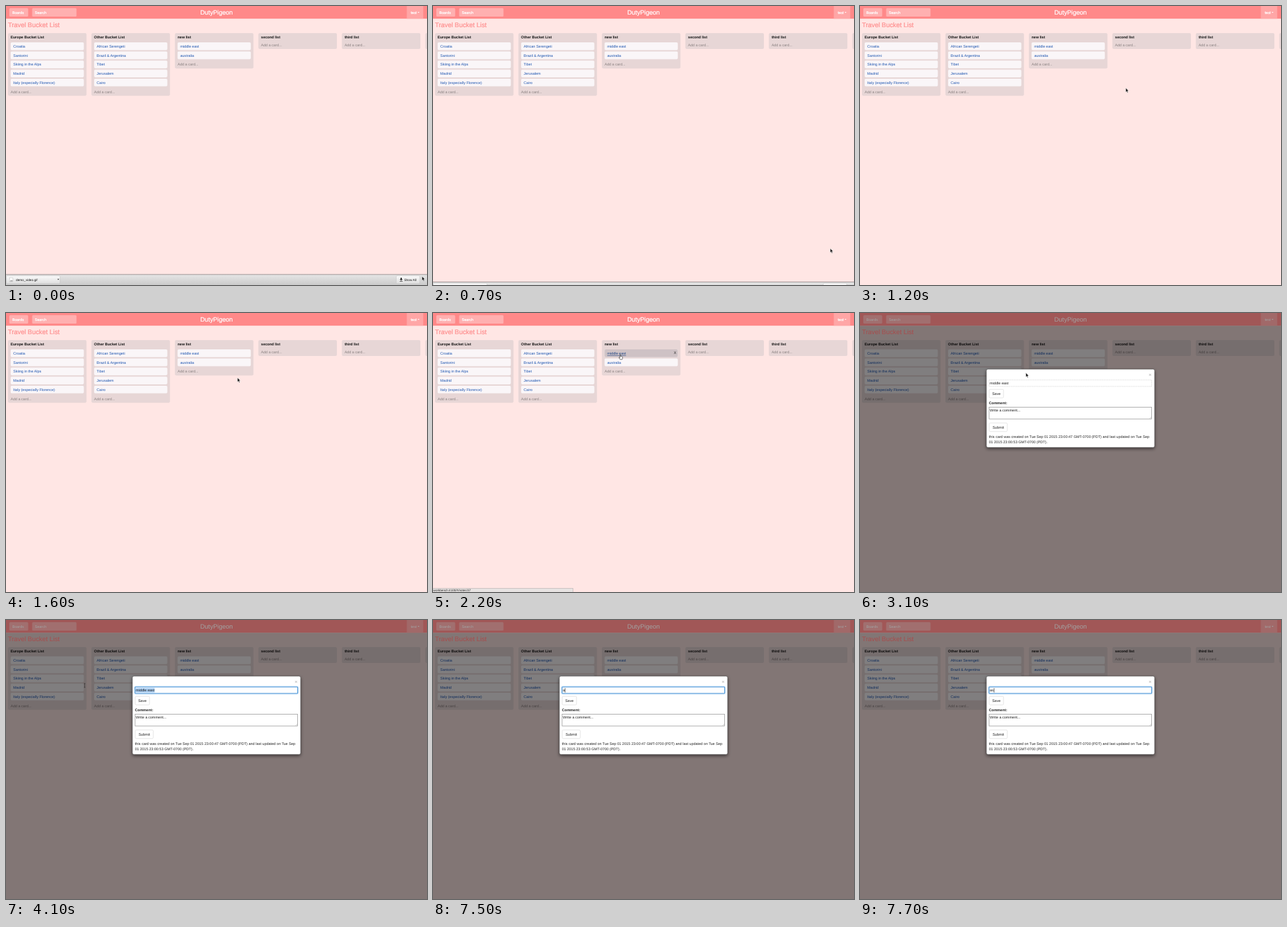
Recreate the animation shown at these times as an HTML page. Size 636 px wide and 422 px high, loop 8000 ms.

```html
<!DOCTYPE html>
<html lang="en">
<head>
<meta charset="utf-8">
<title>Travel board</title>
<style>
html, body { margin: 0; width: 100%; height: 100%; overflow: hidden; background: #ffe6e4; }
svg { display: block; width: 636px; height: 422px; }
text {
  font-family: "Liberation Sans", Arial, sans-serif;
  font-size: 5.55px;
  text-rendering: geometricPrecision;
  white-space: pre;
}
.thick text { stroke: currentColor; stroke-width: .22px; }
</style>
</head>
<body>
<svg id="stage" viewBox="0 0 636 422" xmlns="http://www.w3.org/2000/svg">
  <defs>
    <linearGradient id="shelf" x1="0" y1="0" x2="0" y2="1">
      <stop offset="0" stop-color="#e6e6e6"/><stop offset="1" stop-color="#c9c9c9"/>
    </linearGradient>
    <linearGradient id="button" x1="0" y1="0" x2="0" y2="1">
      <stop offset="0" stop-color="#fafafa"/><stop offset="1" stop-color="#dedede"/>
    </linearGradient>
    <filter id="shadow" x="-10%" y="-10%" width="120%" height="130%">
      <feDropShadow dx="0" dy="2" stdDeviation="2.6" flood-opacity=".55"/>
    </filter>
    <filter id="glow" x="-5%" y="-50%" width="110%" height="200%">
      <feDropShadow dx="0" dy="0" stdDeviation=".8" flood-color="#66afe9" flood-opacity=".8"/>
    </filter>
  </defs>
</svg>
<script>
const LOOP = 8000, STEP = 100;
const stage = document.getElementById('stage');

function el(parent, tag, attrs) {
  const node = document.createElementNS('http://www.w3.org/2000/svg', tag);
  for (const k in attrs) node.setAttribute(k, attrs[k]);
  parent.appendChild(node);
  return node;
}
const group = (parent, attrs) => el(parent, 'g', attrs);
const box = (parent, x, y, width, height, fill, more) =>
  el(parent, 'rect', { x, y, width, height, fill, ...more });
const path = (parent, d, more) => el(parent, 'path', { d, ...more });
function label(parent, x, y, str, fill, more) {
  const node = el(parent, 'text', { x, y, fill, color: fill, ...more });
  node.textContent = str;
  return node;
}
const show = (node, on) => node.setAttribute('display', on ? 'inline' : 'none');

// Page
const page = group(stage);
box(page, 0, 0, 636, 422, '#ffe6e4');
const head = group(page);
box(head, 0, 0, 636, 19.2, '#ff8989');
box(head, 5, 3.3, 28.5, 12.6, '#ffb0b0', { rx: 1.5 });
box(head, 39.5, 3.3, 67, 12.6, '#ffb0b0', { rx: 1.5 });
box(head, 605.5, 0, 24.8, 19.2, '#ffa6a6');
label(head, 9.5, 11.6, 'Boards', '#fff', { 'font-size': 5.6 });
label(head, 43.5, 11.5, 'Search', '#fff');
label(head, 318, 13, 'DutyPigeon', '#fff', { 'text-anchor': 'middle', style: 'font-size:9.5px' });
label(head, 611.5, 11.5, 'test', '#fff');
path(head, 'M621.8 9h2.8l-1.4 1.5z', { fill: '#fff' });

const lists = [
  ['Europe Bucket List', 'Croatia', 'Santorini', 'Skiing in the Alps', 'Madrid', 'Italy (especially Florence)'],
  ['Other Bucket List', 'African Serengeti', 'Brazil & Argentina', 'Tibet', 'Jerusalem', 'Cairo'],
  ['new list', 'middle east', 'australia'],
  ['second list'],
  ['third list'],
  ['']
];
const PITCH = 13.73;
lists.forEach(([name, ...cards], i) => {
  const x = 3 + i * 126.1;
  const extra = cards.length ? cards.length * PITCH + 2 : 0;
  box(page, x, 41, 118.6, 24 + extra, '#e7d6d6', { rx: 2 });
  if (!name) return;
  label(page, x + 4, 49, name, '#111', { 'font-weight': 'bold' });
  cards.forEach((card, j) => {
    const y = 55 + j * PITCH;
    box(page, x + 4, y, 110.6, 11.7, '#faf6f8', { rx: 1.8 });
    label(page, x + 8, y + 8, card, '#1d55b0');
  });
  label(page, x + 4, 61 + extra, 'Add a card...', '#8b8282');
});

const hover = group(page);
box(hover, 259.2, 55, 110.6, 11.7, '#cec2c5', { rx: 1.8 });
label(hover, 263.2, 63, 'middle east', '#1f4684', { 'text-decoration': 'underline' });
label(hover, 365.6, 61.7, 'X', '#222', { 'text-anchor': 'middle' });

// Backdrop
const dim = group(stage);
box(dim, 0, 19.2, 636, 402.8, '#000', { opacity: .49 });
box(dim, 0, 0, 636, 19.2, '#000', { opacity: .37 });

const heading = group(stage);
const title = label(heading, 3, 32, 'Travel Bucket List', '#ff8f8f', { style: 'font-size:9.9px' });

// Dialog
const dialog = group(stage);
box(dialog, 191, 85, 254, 118.3, '#fff', { rx: 2.2, stroke: '#444', 'stroke-width': .5, filter: 'url(#shadow)' });
label(dialog, 438.2, 96, '×', '#aaa', { 'text-anchor': 'middle', style: 'font-size:7.6px' });
const line = (fill, w) => ({ stroke: fill, 'stroke-width': w });
const idle = box(dialog, 195, 101.2, 245.6, 9.8, '#fff', { ...line('#bbb', .6), 'stroke-dasharray': '.8 .8' });
const focus = box(dialog, 195, 101.2, 245.6, 9.8, '#fff', { ...line('#4a94d6', 1.1), rx: .6, filter: 'url(#glow)' });
const marked = box(dialog, 196, 102.8, 28.5, 6.8, '#a9cdf2');
const field = label(dialog, 196, 108, '', '#222');
const caret = box(dialog, 0, 103, .6, 6.6, '#111');
box(dialog, 195.2, 115.4, 21.6, 13, '#fff', { rx: 1.5, ...line('#ccc', .5) });
label(dialog, 206, 123.9, 'Save', '#222', { 'text-anchor': 'middle' });
label(dialog, 194.8, 138.2, 'Comment:', '#222', { 'font-weight': 'bold' });
box(dialog, 195, 142.4, 245.6, 17.8, '#fff', line('#8d8d8d', .7));
label(dialog, 196, 149.3, 'Write a comment...', '#222');
path(dialog, 'M437.6 159.6l2.4-2.4M439 159.6l1-1', { ...line('#888', .4) });
box(dialog, 195.2, 166.3, 27.2, 13, '#fff', { rx: 1.5, ...line('#ccc', .5) });
label(dialog, 208.8, 174.8, 'Submit', '#222', { 'text-anchor': 'middle' });
['this card was created on Tue Sep 01 2015 23:00:47 GMT-0700 (PDT) and last updated on Tue Sep',
 '01 2015 23:00:53 GMT-0700 (PDT).'].forEach((str, i) =>
  label(dialog, 194.8, 189.4 + i * 8, str, '#222', { style: 'font-size:5.52px' }));

// Link status
const status = group(stage);
box(status, -1, 416.4, 212.5, 7, '#e7e3e2', line('#a9a2a2', .5));
label(status, .6, 421.2, 'workbench:4100/#/notes/37', '#222', { style: 'font-size:4.6px' });

// Download shelf
const shelf = group(stage);
box(shelf, 0, 406, 636, 17, 'url(#shelf)');
box(shelf, 0, 405.6, 636, 1, '#9c9494');
box(shelf, .5, 408, 81.2, 12, 'url(#button)', { rx: 1.5, ...line('#bdbdbd', .5) });
box(shelf, 5.5, 411, 4.6, 6, '#fff', line('#aaa', .4));
path(shelf, 'M6 416.6l1.6-2.4 1 1.2 1.2-1v2.2z', { fill: '#9a9a9a' });
label(shelf, 15, 415.7, 'demo_video.gif', '#111', { style: 'font-size:4.8px' });
path(shelf, 'M77.6 412.8h2.8l-1.4 1.6z', { fill: '#333' });
box(shelf, 589.5, 408, 35.5, 12, 'url(#button)', { rx: 1.5, ...line('#bdbdbd', .5) });
path(shelf, 'M596 411h2v2.2h1.4l-2.4 2.4-2.4-2.4h1.4zM594.8 416h4.4v.8h-4.4z', { fill: '#333' });
label(shelf, 601.4, 415.7, 'Show All', '#111', { style: 'font-size:4.8px' });

// Pointers
const arrow = path(stage, 'M0 0V6.2L1.4 4.9L2.4 7.2L3.4 6.8L2.4 4.5H4.3Z',
  { fill: '#111', stroke: '#fff', 'stroke-width': .4 });
const hand = path(stage,
  'M-.6-.8Q0-1.5.6-.8V1.6Q1.3 1.2 1.6 1.9Q2.3 1.6 2.6 2.3Q3.4 2.2 3.4 3V4.6L2.8 6.2H-.4L-2 3.8Q-2.3 2.9-1.6 2.9L-.6 3.7Z',
  { fill: '#fff', stroke: '#222', 'stroke-width': .6 });
const beam = path(stage, 'M-1-3H1M0-3V3M-1 3H1', { fill: 'none', stroke: '#222', 'stroke-width': .6 });

// Pointer stops: time, x, y
const stops = [
  [0, 628.5, 409], [400, 630.3, 411.5], [600, 630.3, 411.5], [800, 570, 322],
  [1200, 401.5, 124], [1400, 378, 112], [2000, 285, 66], [2200, 283, 64],
  [2600, 283, 64], [3400, 233, 105], [3800, 233, 105], [3900, 205, 104],
  [4000, 150, 101], [4100, 118.8, 99]
];
function pointer(t) {
  const i = stops.findIndex(s => s[0] > t);
  if (i < 0) return stops[stops.length - 1].slice(1);
  const [a, x, y] = stops[i - 1], [b, x2, y2] = stops[i];
  const u = (t - a) / (b - a), k = u * u * (3 - 2 * u) * .4 + u * .6;
  return [x + (x2 - x) * k, y + (y2 - y) * k];
}

function draw(now) {
  const t = Math.floor((now % LOOP) / STEP) * STEP;
  const [x, y] = pointer(t);
  const open = t >= 2300;
  const onCard = x > 259 && x < 370 && y > 55 && y < 66.8 && t < 2700;
  const onField = open && y > 101 && t >= 2700 || t >= 3900;
  const typing = t >= 7500;
  const focused = t >= 3400;

  show(hover, onCard);
  show(status, t >= 2000 && t < 2900);
  show(dim, open);
  show(dialog, open);
  head.setAttribute('class', open ? '' : 'thick');
  heading.setAttribute('class', open ? '' : 'thick');
  title.setAttribute('fill', open ? '#a84c4c' : '#ff8f8f');

  const slide = Math.min(1, Math.max(0, (t - 500) / 300));
  show(shelf, slide < 1);
  shelf.setAttribute('transform', `translate(0 ${slide * 17})`);

  show(idle, !focused);
  show(focus, focused);
  const left = Math.max(196, x);
  show(marked, t >= 3900 && !typing);
  marked.setAttribute('x', left);
  marked.setAttribute('width', Math.max(0, 224.5 - left));
  field.textContent = !typing ? 'middle east' : t < 7700 ? 'a' : 'as';
  show(caret, typing || focused && t < 3900);
  caret.setAttribute('x', !typing ? 224.4 : t < 7700 ? 199.2 : 202);

  show(hand, onCard);
  show(beam, onField && !typing);
  show(arrow, !onCard && !onField);
  for (const p of [hand, beam, arrow]) p.setAttribute('transform', `translate(${x} ${y})`);
}

const start = performance.now();
function tick() {
  draw(performance.now() - start);
  requestAnimationFrame(tick);
}
draw(0);
requestAnimationFrame(tick);
</script>
</body>
</html>
```
